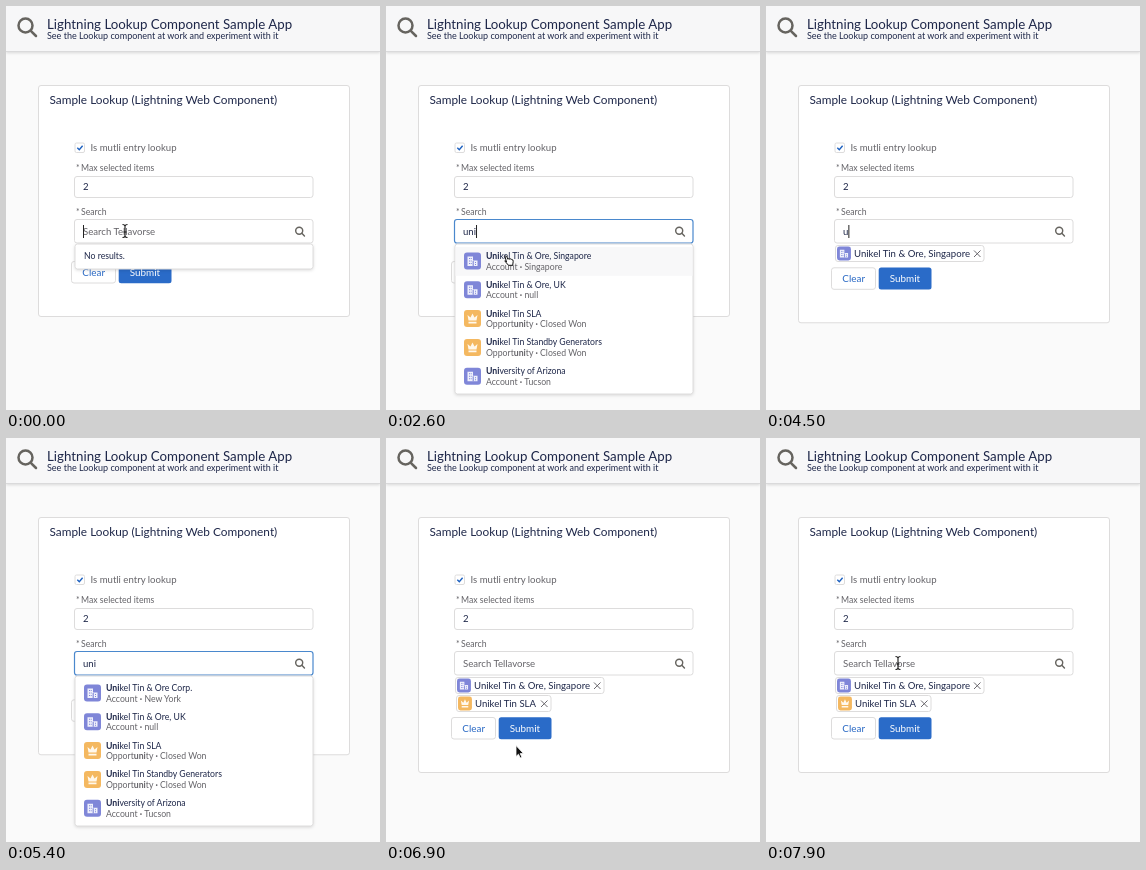
Animation, 374 px wide and 404 px high, one loop 8000 ms. Source, as an HTML page:

```html
<!DOCTYPE html>
<html lang="en">
<head>
<meta charset="utf-8">
<title>Lookup sample</title>
<style>
  html, body { margin: 0; width: 100%; height: 100%; overflow: hidden; background: #fafafa; }
  svg { display: block; width: 374px; height: 404px; font: 9.6px Lato, "Open Sans", sans-serif; fill: #1e2749; }
  .box { fill: #fff; stroke: #dddcdc; }
  .focus { stroke: #4a88cd; stroke-width: 1.2; }
  .grey { fill: #646368; }
  .small { font-size: 8.7px; }
  .row { font-size: 8.7px; }
  .lens { fill: none; stroke: #66645f; stroke-linecap: round; }
  .shade { filter: drop-shadow(0 1.5px 1.5px #0002); }
  .hit { font-weight: 700; }
</style>
</head>
<body>
<svg viewBox="0 0 374 404">
  <defs>
    <g id="account">
      <rect width="17" height="17" rx="3" fill="#7f86d8"/>
      <path d="M3.5 13.5V4h5.5v4h4.5v5.5z" fill="#eff0fb"/>
      <path d="M5 6h1M6.7 6h1M5 8.5h1M6.7 8.5h1M5 11h1M6.7 11h1M9.2 8.5v5M11 10h1M11 12h1" stroke="#7f86d8" stroke-width="1.1"/>
    </g>
    <g id="opportunity">
      <rect width="17" height="17" rx="3" fill="#f4b860"/>
      <path d="M3.5 5l3 2.5 2-4 2 4 3-2.5-1 5.5h-8zM4.5 11.7h8v1.6h-8z" fill="#fff8ec"/>
    </g>
    <g id="lens">
      <circle r="7"/><path d="M5.3 5.3L10.5 10.5"/>
    </g>
  </defs>

  <rect width="374" height="404" fill="#fafafa"/>
  <g class="shade">
    <rect width="374" height="45" fill="#f7f7f8"/>
    <path d="M0 45.5H374" stroke="#dadadb"/>
  </g>
  <use href="#lens" class="lens" stroke-width="2.5" x="19.5" y="19.5"/>
  <text x="41" y="22.5" font-size="13.3">Lightning Lookup Component Sample App</text>
  <text x="41" y="33" font-size="9">See the Lookup component at work and experiment with it</text>

  <rect id="card" class="box" x="32.5" y="79.5" width="311" rx="2.5"/>
  <text x="43.5" y="98" font-size="11.83">Sample Lookup (Lightning Web Component)</text>
  <rect class="box" x="69" y="137" width="9.5" height="9.5" rx="1.5"/>
  <path d="M71.3 141.8l2 2 3.3-4" fill="none" stroke="#1f62c0" stroke-width="1.4"/>
  <text class="grey" x="84.5" y="145">Is mutli entry lookup</text>
  <text class="grey small" x="70" y="165">*</text>
  <text class="grey small" x="75" y="165">Max selected items</text>
  <rect class="box" x="68.5" y="170.5" width="238.5" height="21" rx="2.5"/>
  <text x="77" y="184">2</text>
  <text class="grey small" x="70" y="209">*</text>
  <text class="grey small" x="75" y="209">Search</text>

  <g id="buttons">
    <rect class="box" x="65.5" y="255.5" width="44" height="21.5" rx="2.5"/>
    <text x="87.7" y="269.5" text-anchor="middle" font-size="9.9" fill="#2868c4">Clear</text>
    <rect id="submit" x="112.7" y="255.3" width="52.8" height="22" rx="2.5"/>
    <text x="139" y="269.5" text-anchor="middle" font-size="9.9" fill="#fff">Submit</text>
  </g>

  <rect id="field" class="box" x="68.5" y="213.5" width="238.5" height="23.5" rx="2.5"/>
  <g class="lens" stroke-width="2.9" transform="translate(293.2 224.7) scale(.5)"><use href="#lens"/></g>
  <text id="hint" class="grey" x="77" y="229">Search Tellavorse</text>
  <text id="typed" x="77" y="229"></text>
  <path id="caret" d="M0 219v13" stroke="#222"/>

  <g id="pills"></g>
  <g id="panel"></g>

  <g id="cursor" stroke-linejoin="round">
    <path id="beam" d="M-2.5-6.5q2 0 2.5 1.2q.5-1.2 2.5-1.2M0-5.5V5.5M-2.5 6.5q2 0 2.5-1.2q.5 1.2 2.5 1.2M-1.5 1h3"
      fill="none" stroke="#111" stroke-width="1.1"/>
    <path id="arrow" d="M0-4.500v11l2.500-2.300 1.700 3.800 1.700-.8-1.700-3.600h3.300z" fill="#111" stroke="#fff" stroke-width=".8"/>
    <path id="hand" d="M-1.500 2l-1.500-5.500q.7-1.500 1.800 0l1 2.700 1-.6 1 .6 1-.4.900.7q1.600 0 1.500 1.800l-.5 4H.500l-3.700-4.300q0-1.500 1.700 1z"
      fill="#fff" stroke="#111"/>
  </g>
</svg>
<script>
const $ = id => document.getElementById(id);
const show = (id, on) => $(id).setAttribute("visibility", on ? "visible" : "hidden");
const LOOP = 8000, ROW = 28.8, LIST_TOP = 241;

// [start, typed text, panel, picked items, caret]
const steps = [
  [0, "", "none", 0, true],
  [1000, "u", "", 0, true],
  [1100, "un", "", 0, true],
  [1200, "un", "none", 0, true],
  [1400, "uni", "none", 0, true],
  [1600, "uni", "busy", 0, true],
  [1800, "uni", "list", 0, true],
  [2800, "", "", 1, false],
  [3400, "", "none", 1, true],
  [4400, "u", "", 1, true],
  [4600, "u", "none", 1, true],
  [4900, "uni", "none", 1, true],
  [5200, "uni", "busy", 1, true],
  [5400, "uni", "list", 1, true],
  [6800, "", "", 2, false],
];
const keyTimes = [0, 1000, 1100, 1400, 3400, 4400, 4900];
const hiddenPointer = [[1000, 2200], [4400, 5700]];
const pointerPath = [
  [0, 119, 225], [2200, 119, 225], [2500, 122, 254], [3100, 122, 254], [3400, 122, 225],
  [5700, 122, 225], [6100, 130, 281], [6250, 130, 281], [6550, 130, 312],
  [7350, 130, 312], [7600, 131, 288], [7880, 132, 225], [LOOP, 132, 225],
];
const drop = [0, 6.3, 24];

const items = {
  singapore: ["account", "Unikel Tin &amp; Ore, Singapore", "Singapore"],
  corp: ["account", "Unikel Tin &amp; Ore Corp.", "New York"],
  uk: ["account", "Unikel Tin &amp; Ore, UK", "null"],
  sla: ["opportunity", "Unikel Tin SLA", "Closed Won"],
  standby: ["opportunity", "Unikel Tin Standby Generators", "Closed Won"],
  college: ["account", "University of Arizona", "Tucson"],
};
const mark = s => s.replace(/uni/gi, '<tspan class="hit">$&</tspan>');
const kinds = { account: "Account", opportunity: "Opportunity" };

const rowMarkup = ([kind, name, detail], i) => `<g class="row" transform="translate(0 ${LIST_TOP + i * ROW})">
  <rect class="hover" x="69.5" width="237" height="${ROW}" fill="#f8f8f9"/>
  <use href="#${kind}" x="78" y="5.5"/>
  <text x="100" y="12">${mark(name)}</text>
  <text class="grey" x="100" y="22.7">${mark(kinds[kind])} <tspan class="hit">·</tspan> ${detail}</text></g>`;

function panelMarkup(panel, picks) {
  if (!panel) return "";
  const frame = h => `<rect class="box shade" x="69" y="238" width="238" height="${h}" rx="2.5"/>`;
  if (panel === "none") return frame(25) + '<text class="small" x="78" y="253">No results.</text>';
  if (panel === "busy") {
    const dots = [...Array(8)].map((_, i) => `<circle cx="188" cy="243" r="1.3" fill="#2868c4"
      opacity="${.3 + i * .09}" transform="rotate(${i * 45} 188 250)"/>`);
    return frame(25) + dots.join("");
  }
  const { singapore, corp, uk, sla, standby, college } = items;
  return frame(150) + [picks ? corp : singapore, uk, sla, standby, college].map(rowMarkup).join("");
}

const pillMarkup = ([kind, name], x, y, width) => `<g transform="translate(${x} ${y})">
  <rect class="box" x=".5" y=".5" width="${width}" height="16" rx="2.5"/>
  <use href="#${kind}" transform="translate(2 1.5) scale(.82)"/>
  <text x="19" y="12">${name}</text>
  <path d="M${width - 9.5} 5.5l6.5 6.5m0-6.5l-6.5 6.5" stroke="#6b696e"/></g>`;

const pillsMarkup = picks =>
  (picks > 0 ? pillMarkup(items.singapore, 69, 239, 148.5) : "") +
  (picks > 1 ? pillMarkup(items.sla, 70, 257, 94.5) : "");

function pointerAt(t) {
  const i = pointerPath.findIndex(p => p[0] > t);
  const [t0, x0, y0] = pointerPath[i - 1], [t1, x1, y1] = pointerPath[i];
  const u = (t - t0) / (t1 - t0), k = u * u * (3 - 2 * u);
  return [x0 + (x1 - x0) * k, y0 + (y1 - y0) * k];
}

let current;
function enter(step) {
  current = step;
  const [, text, panel, picks] = step;
  $("panel").innerHTML = panelMarkup(panel, picks);
  $("pills").innerHTML = pillsMarkup(picks);
  $("typed").textContent = text;
  show("hint", !text);
  $("card").setAttribute("height", 231 + drop[picks]);
  $("buttons").setAttribute("transform", `translate(0 ${drop[picks]})`);
  $("field").classList.toggle("focus", panel === "list");
}

function draw(t) {
  const step = steps.findLast(s => s[0] <= t);
  if (step !== current) enter(step);
  const [, text, panel, picks, caret] = step;

  const lastKey = keyTimes.findLast(k => k <= t);
  show("caret", caret && (t - lastKey) % 1000 < 500);
  const width = text ? $("typed").getComputedTextLength() : 0;
  $("caret").setAttribute("transform", `translate(${77.5 + width} 0)`);

  const [x, y] = pointerAt(t);
  const visible = !hiddenPointer.some(([a, b]) => t >= a && t < b);
  const onField = y < 237;
  const onList = panel === "list" && y >= LIST_TOP;
  const onSubmit = picks === 2 && y > 279 && y < 301.5;
  const shape = onField ? "beam" : onList || onSubmit ? "hand" : "arrow";
  for (const id of ["beam", "arrow", "hand"]) show(id, visible && id === shape);
  $("cursor").setAttribute("transform", `translate(${x} ${y})`);
  $("submit").setAttribute("fill", onSubmit ? "#1f58ab" : "#2a6bc8");

  const hovered = onList ? Math.floor((y - LIST_TOP) / ROW) : -1;
  document.querySelectorAll(".hover").forEach((row, i) => row.setAttribute("opacity", +(i === hovered)));
}

function tick() {
  draw(performance.now() % LOOP);
  requestAnimationFrame(tick);
}
tick();
</script>
</body>
</html>
```
